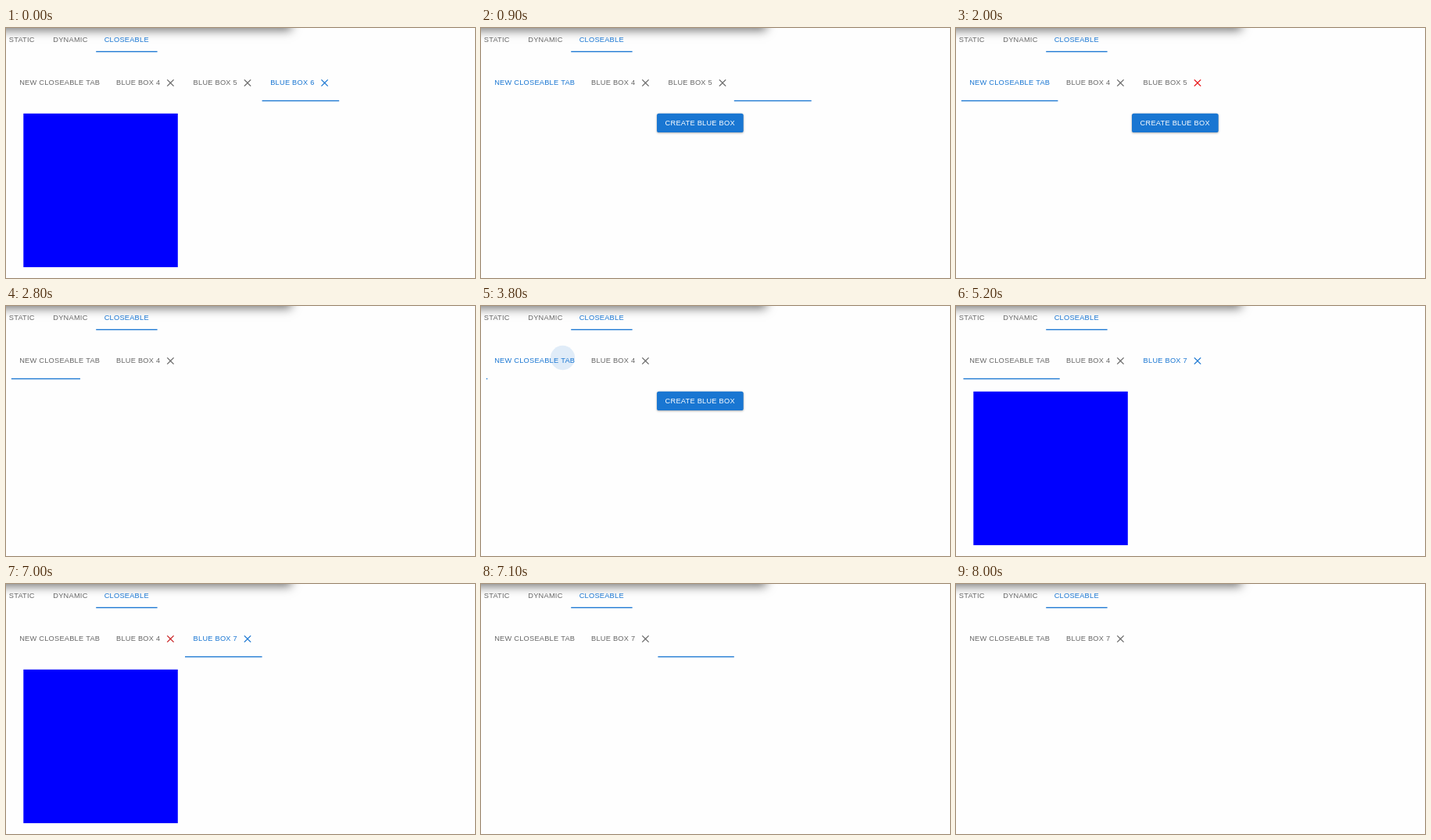
These frames come from a looping animation (600x321 px, 8.1 s). An HTML page with a canvas:

```html
<!DOCTYPE html>
<html lang="en">
<head>
<meta charset="utf-8">
<title>Closeable tabs</title>
<style>
  html, body { margin: 0; width: 100%; height: 100%; overflow: hidden; background: #fefefe; }
  canvas { display: block; width: 600px; height: 321px; }
</style>
</head>
<body>
<canvas id="stage"></canvas>
<script>
const W = 600, H = 321, LOOP = 8100;
const GREY = [102, 102, 102], BLUE = [25, 118, 210], RED = [232, 12, 16], DEEP_RED = [200, 28, 30];
const HOVER_BLUE = [21, 101, 192], WHITE = [255, 255, 255];

// Moments when the tab set or the selection changes
const CLOSE_6 = 880, CLOSE_5 = 2720, SELECT_NEW = 3780, CREATE_7 = 5180, CLOSE_4 = 7080;

const NEW_TAB = { x: 6.8, w: 123.6 };
const BOX_W = 98.6;
const slotX = i => 130.4 + i * BOX_W;

const canvas = document.getElementById('stage');
const ctx = canvas.getContext('2d');
const dpr = window.devicePixelRatio || 1;
canvas.width = W * dpr;
canvas.height = H * dpr;

const clamp = v => Math.min(1, Math.max(0, v));
const lerp = (a, b, k) => a + (b - a) * k;
const rgb = (c, a = 1) => `rgba(${c.map(Math.round).join(',')},${a})`;
const blend = (a, b, k) => a.map((v, i) => lerp(v, b[i], k));

// cubic-bezier(0.4, 0, 0.2, 1)
function ease(x) {
  if (x <= 0) return 0;
  if (x >= 1) return 1;
  let lo = 0, hi = 1;
  for (let i = 0; i < 24; i++) {
    const s = (lo + hi) / 2, r = 1 - s;
    if (3 * r * r * s * 0.4 + 3 * r * s * s * 0.2 + s * s * s < x) lo = s; else hi = s;
  }
  return 3 * (1 - lo) * lo * lo + lo * lo * lo;
}

const progress = (t, start, length) => ease((t - start) / length);

// Each step is [start, length, target]
function track(t, first, steps) {
  return steps.reduce((v, [start, length, target]) => blend(v, target, progress(t, start, length)), first);
}

const indicatorSteps = [
  [CLOSE_6, 300, [NEW_TAB.x, NEW_TAB.w]],
  [CLOSE_5, 300, [NEW_TAB.x, 0]],
  [SELECT_NEW, 300, [NEW_TAB.x, NEW_TAB.w]],
  [CREATE_7, 300, [slotX(1), BOX_W]],
  [CLOSE_4, 300, [NEW_TAB.x, 0]]
];

const crossColor = {
  4: t => track(t, GREY, [[6550, 250, RED], [6920, 80, DEEP_RED]]),
  5: t => track(t, GREY, [[1440, 260, RED]]),
  6: t => track(t, BLUE, [[40, 260, RED]]),
  7: t => t < CLOSE_4
    ? track(t, BLUE, [[6140, 260, RED], [6430, 240, BLUE]])
    : track(t, GREY, [[7120, 260, RED], [7450, 250, GREY]])
};

function stateAt(t) {
  if (t < CLOSE_6) return { boxes: [4, 5, 6], active: 6 };
  if (t < CLOSE_5) return { boxes: [4, 5], active: 'new' };
  if (t < SELECT_NEW) return { boxes: [4], active: null };
  if (t < CREATE_7) return { boxes: [4], active: 'new' };
  if (t < CLOSE_4) return { boxes: [4, 7], active: 7 };
  return { boxes: [7], active: null };
}

function label(text, x, y, color) {
  ctx.fillStyle = rgb(color);
  ctx.fillText(text, x, y);
}

function cross(cx, cy, color) {
  const r = 4.15;
  ctx.strokeStyle = rgb(color);
  ctx.lineWidth = 1.32;
  ctx.beginPath();
  ctx.moveTo(cx - r, cy - r);
  ctx.lineTo(cx + r, cy + r);
  ctx.moveTo(cx + r, cy - r);
  ctx.lineTo(cx - r, cy + r);
  ctx.stroke();
}

function underline(x, y, w) {
  ctx.fillStyle = rgb(BLUE);
  ctx.fillRect(x, y, w, 1.35);
}

function ripple(t, { start, release, x, y, radius, color, area }) {
  const age = t - start;
  if (age <= 0 || t >= release + 550) return;
  const k = progress(t, start, 550);
  ctx.save();
  ctx.beginPath();
  ctx.rect(...area);
  ctx.clip();
  ctx.fillStyle = rgb(color, lerp(0.1, 0.3, k) * (1 - progress(t, release, 550)));
  ctx.beginPath();
  ctx.arc(x, y, radius * k, 0, Math.PI * 2);
  ctx.fill();
  ctx.restore();
}

function withShadow(y, blur, alpha, draw) {
  ctx.save();
  ctx.shadowColor = `rgba(0,0,0,${alpha})`;
  ctx.shadowOffsetY = y * dpr;
  ctx.shadowBlur = blur * dpr;
  draw();
  ctx.restore();
}

function header() {
  withShadow(3, 12, 0.55, () => {
    ctx.fillStyle = '#888';
    ctx.fillRect(-60, -80, 425, 79.5);
  });
  label('STATIC', 3.8, 17.8, GREY);
  label('DYNAMIC', 60.3, 17.8, GREY);
  label('CLOSEABLE', 125.7, 17.8, BLUE);
  underline(115.2, 29.7, 78.4);
}

function tabs(t, { boxes, active }) {
  label('NEW CLOSEABLE TAB', 17.2, 73.3, active === 'new' ? BLUE : GREY);
  boxes.forEach((n, i) => {
    const x = slotX(i);
    label('BLUE BOX ' + n, x + 10.6, 73.3, active === n ? BLUE : GREY);
    cross(x + 80, 70.5, crossColor[n](t));
  });
  const [x, w] = track(t, [slotX(2), BOX_W], indicatorSteps);
  if (w > 0.05) underline(x, 92.8, w);
}

function button(t) {
  const x = 225, y = 109.8, w = 110.7, h = 24.2;
  const hover = t > SELECT_NEW ? progress(t, 4130, 260) : 0;
  const shape = () => {
    ctx.fillStyle = rgb(blend(BLUE, HOVER_BLUE, hover));
    ctx.beginPath();
    ctx.roundRect(x, y, w, h, 2.6);
    ctx.fill();
  };
  withShadow(lerp(0.8, 1.6, hover), lerp(2.6, 4.5, hover), lerp(0.38, 0.45, hover), shape);
  ripple(t, { start: 4960, release: 5160, x: 280, y: 122, radius: 57, color: WHITE, area: [x, y, w, h] });
  label('CREATE BLUE BOX', 235.6, 125.1, WHITE);
}

function draw(t) {
  const state = stateAt(t);
  ctx.setTransform(dpr, 0, 0, dpr, 0, 0);
  ctx.fillStyle = '#fefefe';
  ctx.fillRect(0, 0, W, H);
  ctx.font = '9.21px "Liberation Sans", Arial, sans-serif';
  ctx.letterSpacing = '0.263px';
  ctx.textBaseline = 'alphabetic';

  header();
  if (t < CLOSE_5) {
    ripple(t, { start: 2580, release: 2700, x: 309, y: 70, radius: 86, color: GREY, area: [slotX(1), 47, BOX_W, 47] });
  }
  ripple(t, { start: 3685, release: SELECT_NEW, x: 104.5, y: 66.5, radius: 102, color: BLUE, area: [NEW_TAB.x, 47, NEW_TAB.w, 47] });
  tabs(t, state);

  if (state.active === 'new') {
    button(t);
  } else if (state.active) {
    ctx.fillStyle = '#00f';
    ctx.fillRect(22.3, 109.8, 197.5, 197.3);
  }
}

const origin = performance.now();
function tick() {
  draw((performance.now() - origin) % LOOP);
  requestAnimationFrame(tick);
}
tick();
</script>
</body>
</html>
```
